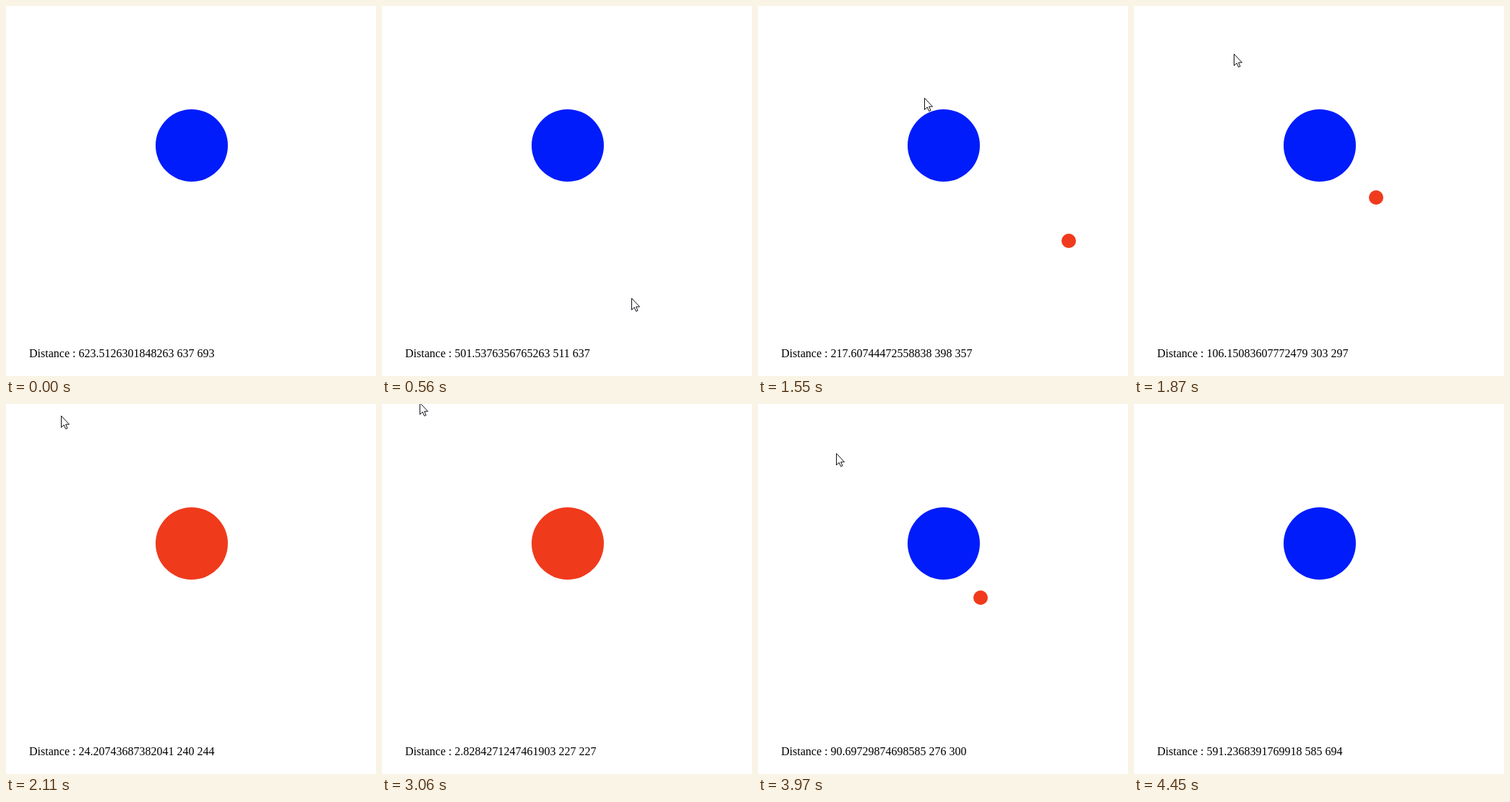
Recreate the animation shown at these times as an HTML page. Size 512x512 px, loop 4.76 s.

```html
<!DOCTYPE html>
<html lang="en">
<head>
<meta charset="utf-8">
<title>Circle collision</title>
<style>
  html, body { margin: 0; width: 100%; height: 100%; overflow: hidden; background: #fff; }
  svg { display: block; width: 512px; height: 512px; }
  text { font: 16px "Liberation Serif", "Times New Roman", serif; white-space: pre; }
</style>
</head>
<body>
<svg viewBox="0 0 512 512">
  <circle id="big" cx="257" cy="193" r="50"/>
  <circle id="dot" r="10" fill="#f03a1c"/>
  <text id="label" x="32" y="486"></text>
  <path id="cursor" d="M.5 .5V16.5L4.2 13L6.6 18.5L9 17.5L6.6 12.2H11.5Z" fill="#fff" stroke="#101018"/>
</svg>
<script>
const LOOP = 4760, STEP = 57;
const CENTER = 225, REACH = 60, MARGIN = 32;
const RED = '#f03a1c', BLUE = '#001cfa';

// Below EDGE the pointer is outside the canvas and the last reading stays.
const EDGE = 694, BEFORE = [637, 693], AFTER = [585, 694];

// Key points of the gesture: time, pointer x y, arrow tip x y
const PATH = [
  [0, 515, 752, 347, 520],
  [560, 511, 637, 345, 404],
  [1070, 488, 447, 325, 214],
  [1550, 398, 357, 230, 127],
  [1670, 357, 335, 189, 103],
  [2110, 240, 244, 76, 16],
  [2470, 227, 227, 52, -2],
  [3060, 227, 227, 52, -2],
  [3400, 306, 372, 136, 137],
  [3500, 295, 348, 123, 108],
  [3560, 262, 295, 92, 58],
  [3760, 240, 250, 72, 18],
  [3850, 240, 250, 72, 18],
  [4330, 585, 694, 417, 462],
  [4390, 637, 743, 469, 511],
  [4450, 689, 792, 521, 560]
];
const LAST = PATH.length - 1;

const rate = (i, c) => (PATH[i + 1][c] - PATH[i][c]) / (PATH[i + 1][0] - PATH[i][0]);

// Smooth tangent that comes to rest at turns and pauses
function tangent(i, c) {
  const a = rate(Math.max(i - 1, 0), c), b = rate(Math.min(i, LAST - 1), c);
  return a * b > 0 ? 2 * a * b / (a + b) : 0;
}

function pose(t) {
  if (t >= PATH[LAST][0]) return PATH[LAST].slice(1);
  const i = PATH.findIndex(k => k[0] > t) - 1;
  const from = PATH[i], to = PATH[i + 1], span = to[0] - from[0];
  const steps = Math.max(1, Math.round(span / STEP));
  const p = Math.floor((t - from[0]) / span * steps + 0.001) / steps, q = 1 - p;
  return [1, 2, 3, 4].map(c => Math.round(
    from[c] + (to[c] - from[c]) * p * p * (3 - 2 * p) +
    span * p * q * (q * tangent(i, c) - p * tangent(i + 1, c))));
}

const el = id => document.getElementById(id);
const big = el('big'), dot = el('dot'), label = el('label'), cursor = el('cursor');

function draw(t) {
  const [px, py, cx, cy] = pose(t);
  const [x, y] = py <= EDGE ? [px, py] : t < LOOP / 2 ? BEFORE : AFTER;
  const dist = Math.sqrt((x - CENTER) ** 2 + (y - CENTER) ** 2);
  big.setAttribute('fill', dist < REACH ? RED : BLUE);
  dot.setAttribute('cx', x + MARGIN);
  dot.setAttribute('cy', y - MARGIN);
  cursor.setAttribute('transform', `translate(${cx} ${cy})`);
  label.textContent = `Distance : ${dist} ${x} ${y}`;
}

const start = performance.now();
function frame() {
  draw((performance.now() - start) % LOOP);
  requestAnimationFrame(frame);
}
frame();
</script>
</body>
</html>
```
